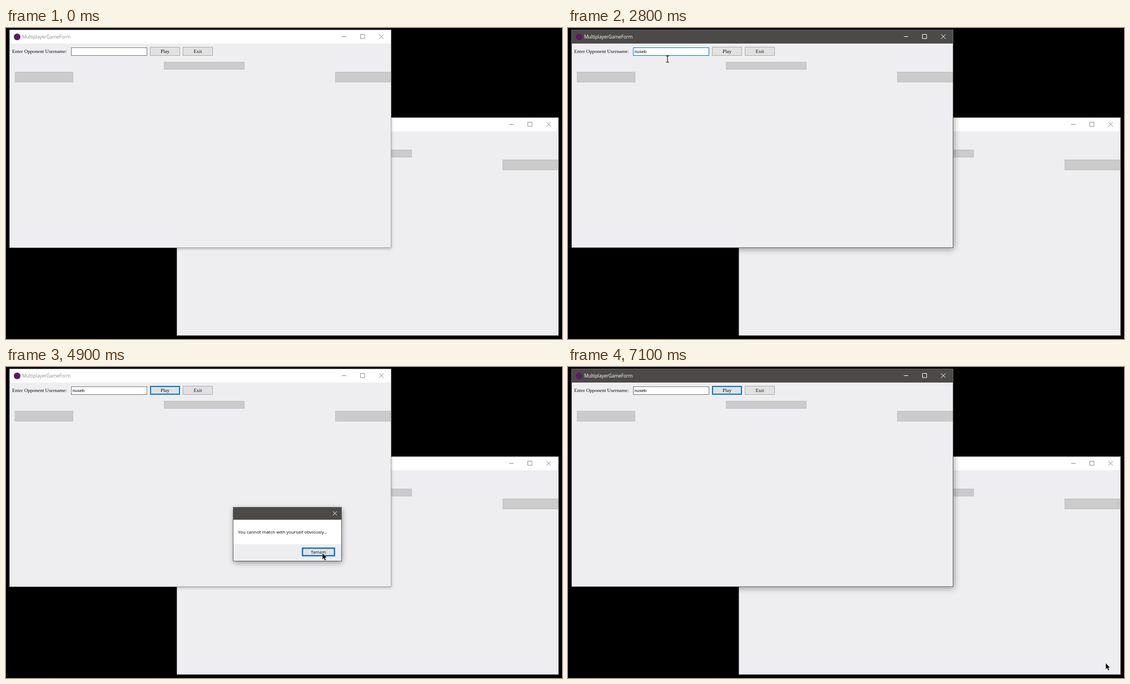
These frames come from a looping animation (1000x560 px, 7200 ms). An HTML page:

```html
<!DOCTYPE html>
<html lang="en">
<head>
<meta charset="utf-8">
<title>Multiplayer form</title>
<style>
html, body { margin: 0; width: 100%; height: 100%; overflow: hidden; background: #000; }
#stage { position: relative; width: 1000px; height: 560px; overflow: hidden; }
:where(#stage *) { position: absolute; left: 0; top: 0; box-sizing: border-box; white-space: nowrap; }
svg { overflow: visible; fill: none; }
svg path { stroke: currentColor; }

.win {
  width: 685px; height: 391px; background: #eeeef0;
  box-shadow: 0 0 0 1px #aaa, 1px 2px 5px rgba(0,0,0,.3);
}
.bar {
  width: 685px; height: 23.5px; background: #fff; color: #8c8c8c;
  font: 8.3px/23px "Open Sans", sans-serif;
}
.bar span { left: 22px; }
.icon { left: 7px; top: 5.5px; width: 12px; height: 12px; border-radius: 50%; background: #5c1a63; }
.active { box-shadow: 0 0 0 1px #666, 2px 3px 11px rgba(0,0,0,.4); }
.active .bar { background: #4c4a48; color: #fff; }

.label, .btn { font: 9px/15px "Liberation Serif", "Times New Roman", serif; color: #111; }
.label { left: 4px; top: 31px; }
.field {
  left: 110px; top: 31px; width: 137px; height: 15px; padding-left: 1.5px;
  background: #fff; border: 1px solid #7a7a7a; color: #000;
  font: 8px/13px "Liberation Sans", Arial, sans-serif;
}
.btn {
  top: 30px; width: 54px; height: 16px; line-height: 16px; text-align: center;
  background: #e1e1e1; box-shadow: inset 0 0 0 1px #adadad;
}
.btn.hover { background: #e5f1fb; box-shadow: inset 0 0 0 1px #0078d7; }
.btn.focus { box-shadow: inset 0 0 0 2px #0078d7; }
.block { background: #cbcbcb; border: 1px solid #c0c0c0; }

#dialog {
  left: 409px; top: 253px; width: 193.5px; height: 96px; background: #fff; color: #000;
  font: 8px/12px "Open Sans", sans-serif;
  box-shadow: 0 0 0 1px rgba(0,0,0,.5), 1px 3px 10px rgba(0,0,0,.4);
}
#dialog .head { width: 100%; height: 22px; background: #4c4a48; color: #fff; }
#dialog .msg { left: 8px; top: 38px; }
#dialog .foot { top: 65.5px; width: 100%; height: 30.5px; background: #eeeef0; }
#dialog .btn { left: 123px; top: 6.5px; width: 60px; height: 16px; font: 7.8px/16px "Open Sans", sans-serif; }
#dialog .btn::after { content: ""; position: absolute; inset: 2px; border: 1px dotted #777; }
</style>
</head>
<body>
<div id="stage">
  <div class="win" style="left:308px;top:162px"></div>
  <div class="win" id="main" style="left:7px;top:4px"></div>
  <div id="dialog">
    <div class="head"><svg><path d="M179 7l7 7m0-7l-7 7"/></svg></div>
    <span class="msg">You cannot match with yourself obviously...</span>
    <div class="foot"><div class="btn focus">Tamam</div></div>
  </div>
  <svg id="arrow" width="10" height="16">
    <path d="M0 0V11.5L2.6 9.2L4.5 13.4L6.5 12.5L4.7 8.5H8Z" fill="#000" style="stroke:#fff;stroke-width:.5"/>
  </svg>
  <svg id="beam" width="6" height="12"><path d="M-2.5-5.5h5M0-5.5v11M-2.5 5.5h5"/></svg>
</div>
<script>
const LOOP = 7200, STEP = 100, NAME = "nuseb";
const $ = s => document.querySelector(s);
const clamp = v => Math.max(0, Math.min(1, v));

const block = (x, y, w, h) =>
  `<div class="block" style="left:${x}px;top:${y}px;width:${w}px;height:${h}px"></div>`;

for (const win of document.querySelectorAll(".win")) win.innerHTML = `
  <div class="bar"><div class="icon"></div><span>MultiplayerGameForm</span>
    <svg><path d="M597 11.5h8M630.5 7.5h7.5v7.5h-7.5zM664 7.5l8 8m0-8l-8 8"/></svg></div>
  <span class="label">Enter Opponent Username:</span>
  <div class="field"></div>
  <div class="btn play" style="left:252px">Play</div>
  <div class="btn" style="left:311px">Exit</div>
  ${block(277, 57, 145, 14)}${block(9, 75, 105, 19)}${block(585, 75, 100, 19)}`;

const main = $("#main"), field = $("#main .field"), play = $("#main .play");
const dialog = $("#dialog"), arrow = $("#arrow"), beam = $("#beam");

// Pointer stops: time, x, y
const stops = [
  [200, 644, 322], [900, 178, 55], [1400, 178, 55], [1500, 179, 56], [2800, 179, 56],
  [3300, 300, 46], [3700, 300, 46], [4300, 546, 324], [4700, 569, 335],
  [5500, 569, 335], [6600, 967, 533], [LOOP, 967, 533]
];

function pointer(t) {
  const i = Math.max(1, stops.findIndex(s => s[0] > t));
  const [t0, x0, y0] = stops[i - 1], [t1, x1, y1] = stops[i];
  const u = clamp((t - t0) / (t1 - t0)), e = 1 - (1 - u) ** 2;
  return [x0 + (x1 - x0) * e, y0 + (y1 - y0) * e];
}

function fieldBorder(t) {
  if (t < 900 || t >= 3500) return "#7a7a7a";
  const u = clamp((t - 1000) / 200), mix = b => 23 + (b - 23) * u;
  return `rgb(${mix(0)},${mix(120)},${mix(215)})`;
}

function draw(now) {
  const t = Math.floor(now % LOOP / STEP) * STEP;

  main.classList.toggle("active", t >= 1000 && t < 3500 || t >= 5000);
  field.style.borderColor = fieldBorder(t);
  field.textContent = NAME.slice(0, t < 1800 ? 0 : 1 + Math.max(0, (t - 1900) / 100));
  play.classList.toggle("hover", t >= 3100 && t < 3500);
  play.classList.toggle("focus", t >= 3500);

  const shown = clamp(t < 4900 ? (t - 3600) / 192 : 1 - (t - 4900) / 225);
  dialog.style.opacity = shown;
  dialog.style.transform = `scale(${.955 + .045 * shown})`;

  const [x, y] = pointer(t), typing = t >= 900 && t <= 2800;
  arrow.style.display = t >= 200 && !typing ? "" : "none";
  beam.style.display = typing ? "" : "none";
  arrow.style.transform = beam.style.transform = `translate(${x}px,${y}px)`;
}

const start = performance.now();
(function frame() {
  draw(performance.now() - start);
  requestAnimationFrame(frame);
})();
</script>
</body>
</html>
```
